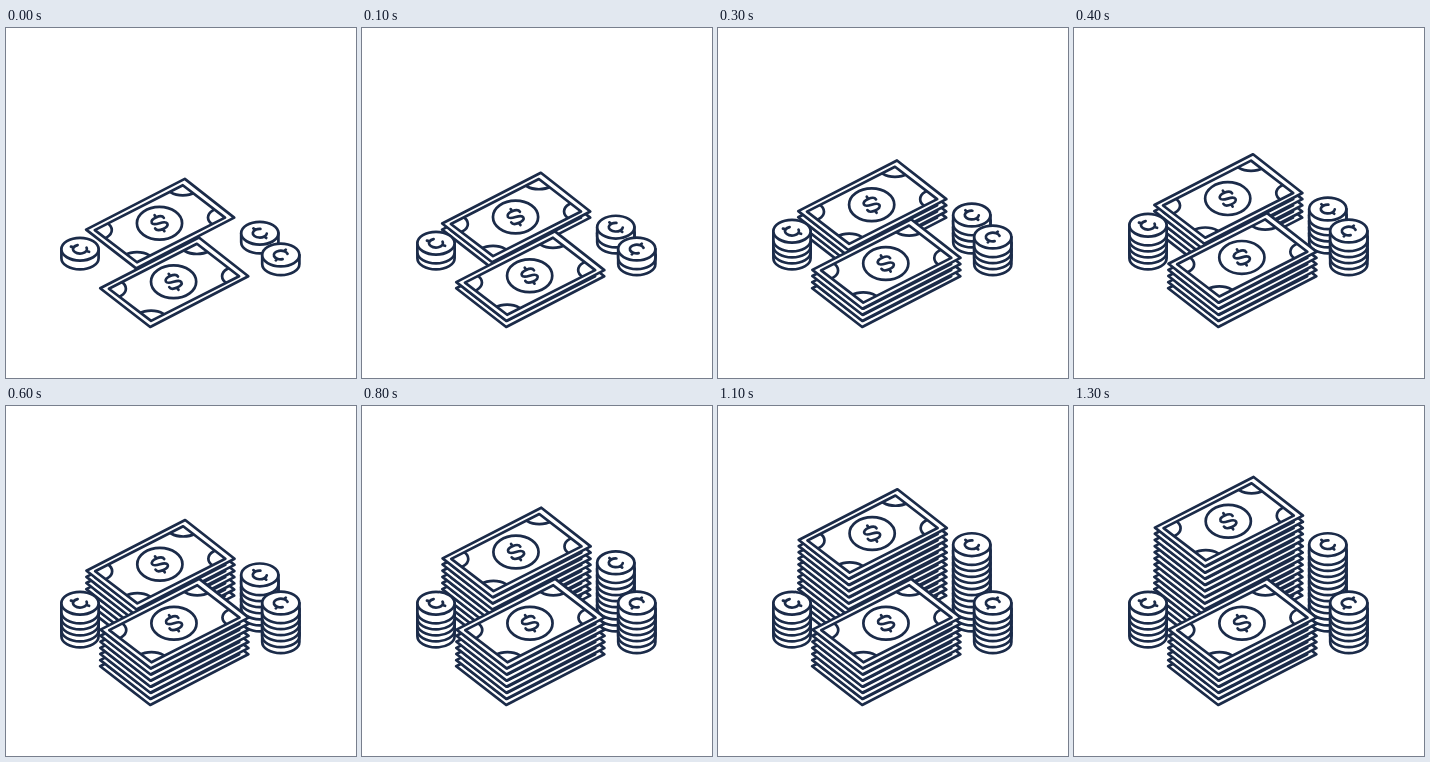
An HTML page that plays this animation: 350x350 px, repeating every 1400 ms.

```html
<!DOCTYPE html>
<html lang="en">
<head>
<meta charset="utf-8">
<title>Growing stacks of money</title>
<style>
html, body { margin: 0; width: 100%; height: 100%; overflow: hidden; background: #fff; }
svg { display: block; width: 100vw; height: 100vh; }
.ink { fill: none; stroke: #1b2b49; stroke-width: 2.7; stroke-linecap: round; stroke-linejoin: round; }
.paper { fill: #fff; }
.sign { vector-effect: non-scaling-stroke; }
</style>
</head>
<body>
<svg viewBox="0 0 350 350">
  <defs>
    <clipPath id="inner"><path d="M-64.7 6.9L23.3 -38L65.5 -5.6L-22.5 39.1Z"/></clipPath>
    <g id="bill">
      <path class="paper" d="M-73.4 6.4L25.3 -44.3L74.7 -5.6L-23.4 45.2Z"/>
      <path d="M-64.7 6.9L23.3 -38L65.5 -5.6L-22.5 39.1Z"/>
      <g clip-path="url(#inner)">
        <ellipse cx="-64.7" cy="6.9" rx="17" ry="10.2"/>
        <ellipse cx="23.3" cy="-38" rx="17" ry="10.2"/>
        <ellipse cx="65.5" cy="-5.6" rx="17" ry="10.2"/>
        <ellipse cx="-22.5" cy="39.1" rx="17" ry="10.2"/>
      </g>
      <ellipse rx="22.6" ry="16.4"/>
      <path class="sign" transform="matrix(1.2 -.52 .52 .85 0 0)" d="M5 -3.2C5 -5.6 2.8 -6.8 0 -6.8C-3 -6.8 -5 -5.4 -5 -3.3C-5 -1 -2.8 -.4 0 0C3 .4 5 1.2 5 3.4C5 5.6 3 6.8 0 6.8C-3 6.8 -5 5.6 -5 3.2M0 -9.4V-6.8M0 9.4V6.8"/>
    </g>
    <g id="coin" class="paper">
      <path d="M-18.6 0V9A18.6 11.2 0 0 0 18.6 9V0"/>
      <ellipse rx="18.6" ry="11.4"/>
    </g>
  </defs>
  <g id="scene" class="ink"></g>
</svg>
<script>
const NS = "http://www.w3.org/2000/svg";
const STEP = 100, STEPS = 14;
const scene = document.getElementById("scene");

function add(parent, tag, attrs) {
  const el = document.createElementNS(NS, tag);
  for (const key in attrs) el.setAttribute(key, attrs[key]);
  return parent.appendChild(el);
}

// Cent sign lying flat on a coin, turned by the given angle
function centPath(turn) {
  const at = (deg, r) => {
    const a = (deg + turn) * Math.PI / 180;
    return `${(r * Math.cos(a)).toFixed(2)} ${(r * 0.62 * Math.sin(a)).toFixed(2)}`;
  };
  return `M${at(-45, 7)}A7 4.34 0 1 0 ${at(45, 7)}M${at(-90, 7)}L${at(-90, 10)}M${at(90, 7)}L${at(90, 10)}`;
}

function stack({ kind, x, y, dx = 0, rise, last, turn }) {
  const group = add(scene, "g", {});
  const layers = [];
  for (let i = 0; i <= last; i++) {
    const layer = add(group, "g", { transform: `translate(${x + dx * i} ${y - rise * i})` });
    add(layer, "use", { href: "#" + kind });
    if (kind === "coin") add(layer, "path", { d: centPath(turn) });
    layers.push(layer);
  }
  return layers;
}

const stacks = [
  { kind: "bill", x: 153.5, y: 195.2, dx: 0.06, rise: 6.15, last: 13 },
  { kind: "coin", x: 253.8, y: 205.2, rise: 6.05, last: 11, turn: -40 },
  { kind: "coin", x: 74, y: 221.2, rise: 6, last: 4, turn: -65 },
  { kind: "bill", x: 167.6, y: 253.8, dx: 0.06, rise: 6.1, last: 6 },
  { kind: "coin", x: 274.8, y: 227, rise: 6, last: 5, turn: 30 }
].map(stack);

function draw(time) {
  const step = Math.floor(time / STEP) % STEPS;
  for (const layers of stacks)
    layers.forEach((layer, i) => layer.setAttribute("display", i <= step ? "inline" : "none"));
}

const start = performance.now();
function tick() {
  draw(performance.now() - start);
  requestAnimationFrame(tick);
}
draw(0);
requestAnimationFrame(tick);
</script>
</body>
</html>
```
